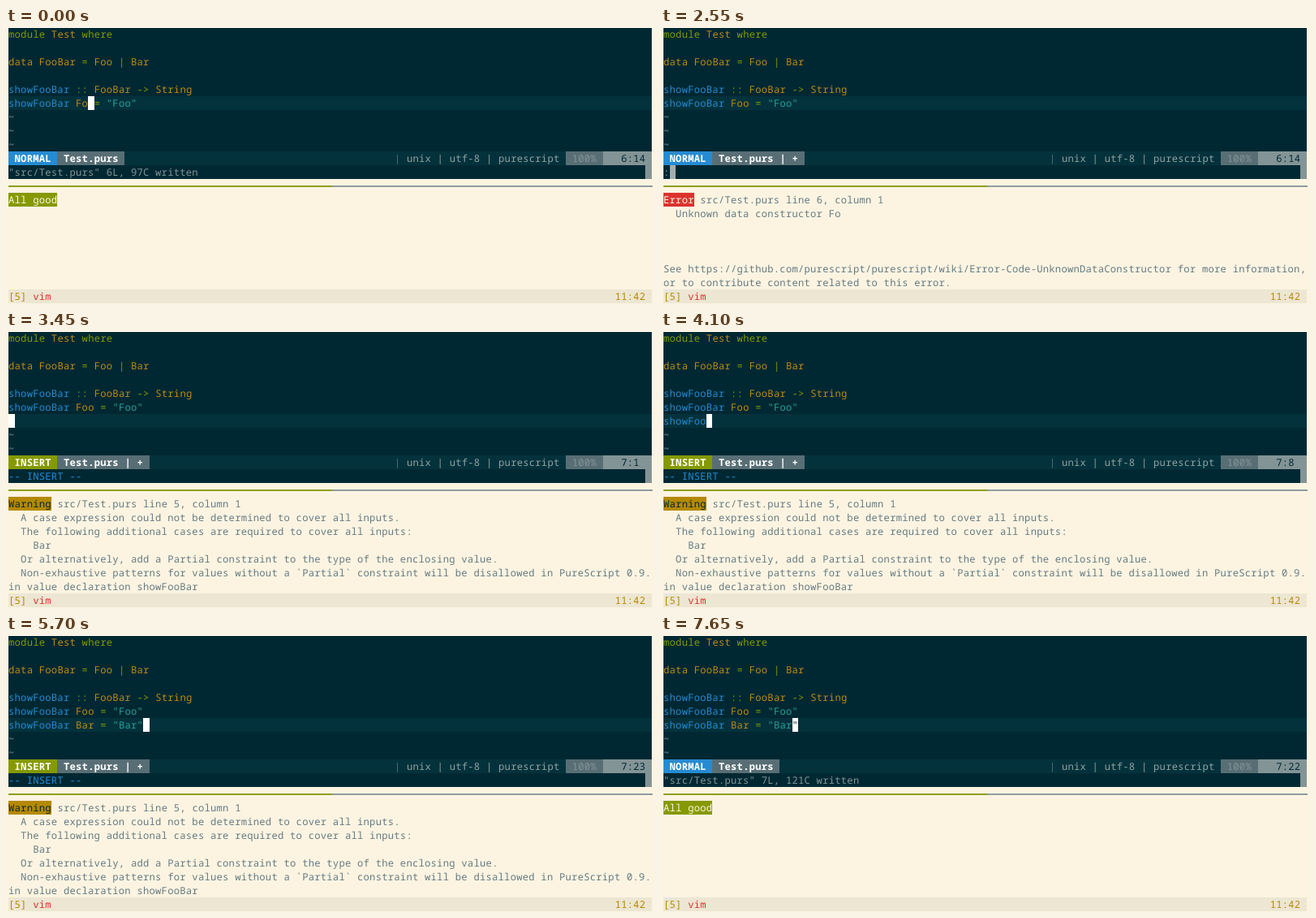
An HTML page for the animation above (7.7 s loop, 800 by 340 pixels).

```html
<!DOCTYPE html>
<html lang="en">
<head>
<meta charset="utf-8">
<title>Editor with live compiler feedback</title>
<style>
  html, body { margin: 0; width: 100%; height: 100%; overflow: hidden; background: #fcf4e1; }
  #stage {
    position: relative; width: 800px; height: 340px; overflow: hidden;
    font: 500 12.2px/17px "Noto Sans Mono", "DejaVu Sans Mono", monospace;
    letter-spacing: 0.232px; text-rendering: geometricPrecision;
  }
  #stage div, #stage span { position: absolute; white-space: pre; }
  #stage span { height: 17px; }
  #editor { left: 3px; top: 0; width: 793px; height: 186px; background: #002833; }
  .rule { top: 194px; height: 2px; }
</style>
</head>
<body>
<div id="stage">
  <div id="editor"></div>
  <div class="rule" style="left:3px;width:399px;background:#8f9d1c"></div>
  <div class="rule" style="left:402px;width:395px;background:#8e9c9f"></div>
  <div id="text"></div>
</div>
<script>
const LOOP = 7700, CELL = 7.552, ROW = 17, COLS = 105;
const C = {
  dark: '#002833', line: '#03323c', gray: '#586e75', light: '#839496', body: '#657b83',
  cream: '#fdf6e3', bar: '#ece6d3', white: '#ffffff', green: '#859900', yellow: '#bd8a14',
  blue: '#268bd2', cyan: '#2aa198', red: '#dc322f', amber: '#b58900'
};
const text = document.getElementById('text');

const REPORTS = {
  good: { tag: 'All good', bg: C.green, fg: C.cream, lines: [''] },
  error: {
    tag: 'Error', bg: C.red, fg: C.cream,
    lines: [
      ' src/Test.purs line 6, column 1',
      '  Unknown data constructor Fo',
      '', '', '',
      'See https://github.com/purescript/purescript/wiki/Error-Code-UnknownDataConstructor for more information,',
      'or to contribute content related to this error.'
    ]
  },
  warning: {
    tag: 'Warning', bg: C.amber, fg: C.dark,
    lines: [
      ' src/Test.purs line 5, column 1',
      '  A case expression could not be determined to cover all inputs.',
      '  The following additional cases are required to cover all inputs:',
      '    Bar',
      '  Or alternatively, add a Partial constraint to the type of the enclosing value.',
      '  Non-exhaustive patterns for values without a `Partial` constraint will be disallowed in PureScript 0.9.',
      'in value declaration showFooBar'
    ]
  }
};

const HEAD = ['module Test where', '', 'data FooBar = Foo | Bar', '', 'showFooBar :: FooBar -> String'];
const FOO = 'showFooBar Foo = "Foo"', BAR = 'showFooBar Bar = "Bar"';
const written = (lines, chars) => `"src/Test.purs" ${lines}L, ${chars}C written`;
const insert = { mode: 'INSERT', msg: '-- INSERT --' };
const normal = { mode: 'NORMAL', msg: '' };

// Each step changes part of the state from its time on.
const steps = [
  [0, { foo: 'showFooBar Fo = "Foo"', bar: null, row: 5, col: 13, mode: 'NORMAL',
        dirty: false, cmd: null, msg: written(6, 97), out: 'good' }],
  [700, { out: 'error' }],
  [1800, insert],
  [2000, { foo: FOO, col: 14, dirty: true }],
  [2250, { ...normal, col: 13 }],
  [2500, { cmd: ':' }],
  [2650, { cmd: ':w' }],
  [2750, { cmd: null, dirty: false, msg: written(6, 98) }],
  [3250, { out: 'warning' }],
  [3350, { ...insert, bar: '', row: 6, col: 0, dirty: true }],
  ...[...BAR].map((ch, i) => [
    i < 15 ? 3550 + i * 90 : 4950 + (i - 15) * 100,
    { bar: BAR.slice(0, i + 1), col: i + 1 }
  ]),
  [5750, { ...normal, col: 21 }],
  [5950, { cmd: ':' }],
  [6080, { cmd: ':w' }],
  [6250, { cmd: null, dirty: false, msg: written(7, 121) }],
  [7000, { out: 'good' }]
];

function put(row, col, str, color, bg, bold) {
  const s = document.createElement('span');
  s.textContent = str;
  s.style.cssText = `left:${3 + col * CELL}px;top:${row * ROW - 1}px;width:${str.length * CELL}px;` +
    `color:${color};background:${bg || 'none'};font-weight:${bold ? 700 : 500}`;
  text.append(s);
}

function tokenColor(word) {
  if (word[0] === '"') return C.cyan;
  if (/^[A-Z]/.test(word) || word === 'data') return C.yellow;
  return /^show?|^s/.test(word) ? C.blue : C.green;
}

function code(row, str) {
  for (const m of str.matchAll(/\S+/g)) put(row, m.index, m[0], tokenColor(m[0]));
}

function drawEditor(s) {
  const lines = [...HEAD, s.foo];
  if (s.bar !== null) lines.push(s.bar);
  put(s.row, 0, ' '.repeat(COLS), C.light, C.line);
  lines.forEach((str, row) => code(row, str));
  for (let row = lines.length; row < 9; row++) put(row, 0, '~', C.light);
  if (s.cmd === null) put(s.row, s.col, lines[s.row][s.col] || ' ', C.dark, C.white);
}

function drawStatus(s) {
  const row = 9;
  put(row, 0, ' '.repeat(COLS), C.light, C.line);
  put(row, 0, ` ${s.mode} `, C.white, s.mode === 'INSERT' ? C.green : C.blue, true);
  put(row, 8, s.dirty ? ' Test.purs | + ' : ' Test.purs ', C.white, C.gray, true);
  put(row, 63, '|', C.gray);
  put(row, 65, 'unix | utf-8 | purescript', '#93a1a1');
  put(row, 91, ' 100% ', C.light, C.gray);
  put(row, 97, `   ${s.row + 1}:${s.col + 1}`.padEnd(8), C.dark, C.light);
  put(row + 1, 104, ' ', C.dark, C.light);
  if (s.cmd === null) {
    put(row + 1, 0, s.msg, s.mode === 'INSERT' ? C.blue : C.light);
  } else {
    put(row + 1, 0, s.cmd, C.light);
    put(row + 1, s.cmd.length, ' ', C.dark, '#a3adad');
  }
}

function drawReport(s) {
  const { tag, bg, fg, lines } = REPORTS[s.out];
  put(12, 0, tag, fg, bg);
  lines.forEach((str, i) => put(12 + i, i ? 0 : tag.length, str, C.body));
  put(19, 0, ' '.repeat(COLS), C.body, C.bar);
  put(19, 0, '[5]', C.amber);
  put(19, 4, 'vim', C.red);
  put(19, 99, '11:42', C.amber);
}

let shown = -1;
function tick() {
  const t = performance.now() % LOOP;
  const count = steps.filter(([time]) => time <= t).length;
  if (count !== shown) {
    shown = count;
    const state = Object.assign({}, ...steps.slice(0, count).map(step => step[1]));
    text.replaceChildren();
    drawEditor(state);
    drawStatus(state);
    drawReport(state);
  }
  requestAnimationFrame(tick);
}
tick();
</script>
</body>
</html>
```
